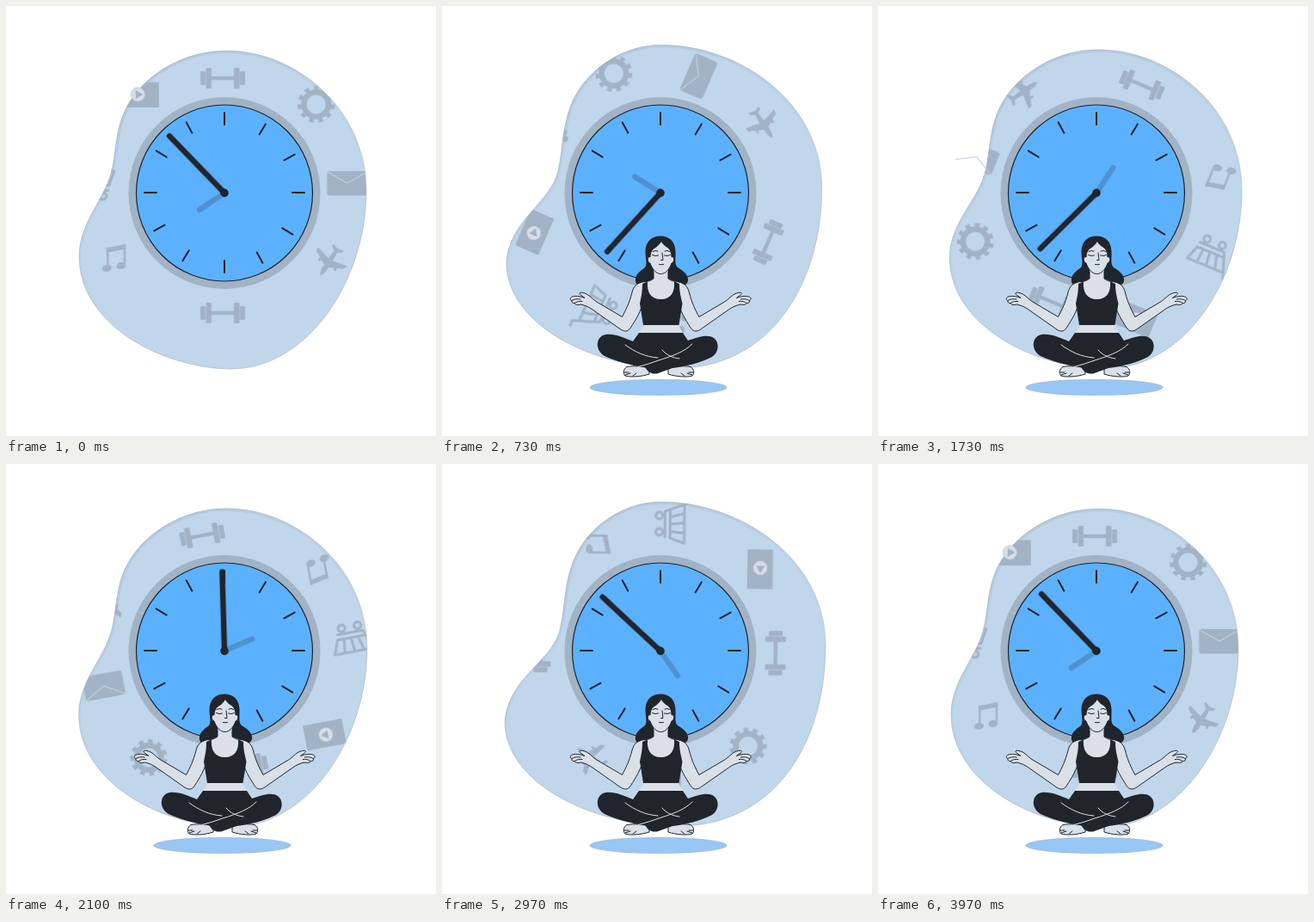
These frames come from a looping animation (500 px wide and 500 px high, 4.01 s). An HTML page without scripts:

```html
<!DOCTYPE html>
<html lang="en">
<head>
<meta charset="utf-8">
<title>Calm time</title>
<style>
  html, body { margin: 0; width: 100%; height: 100%; overflow: hidden; background: #fff; }
  svg { display: block; width: 100vw; height: 100vh; }

  .blob { animation: breathe 4.01s infinite; }
  .ring { animation: ring 4.01s -6ms infinite; }
  .minute { animation: minute 4.01s -6ms infinite; }
  .hour { animation: hour 4.01s -6ms infinite; }
  .rise { animation: rise 4.01s infinite, appear 4.01s infinite; }

  @keyframes breathe {
    0%, 49.5%, 99% {
      d: path("M257 52C205 52 165 80 146 108C128 134 129 160 124 186C117 224 85 250 85 291C85 372 185 422 262 422C350 422 419 320 419 215C419 118 335 52 257 52Z");
      animation-timing-function: cubic-bezier(.37, 0, .63, 1);
    }
    24.75%, 74.25% {
      d: path("M255 44C212 44 177 70 160 98C142 128 144 160 138 188C132 229 77 246 73 300C73 366 165 421 275 421C385 421 446 327 446 211C446 110 347 44 255 44Z");
      animation-timing-function: cubic-bezier(.37, 0, .63, 1);
    }
    100% {
      d: path("M257 52C205 52 165 80 146 108C128 134 129 160 124 186C117 224 85 250 85 291C85 372 185 422 262 422C350 422 419 320 419 215C419 118 335 52 257 52Z");
    }
  }
  @keyframes ring {
    0% { transform: rotate(0deg); animation-timing-function: steps(119); }
    99%, 100% { transform: rotate(-360deg); }
  }
  @keyframes minute {
    0% { transform: rotate(-44deg); animation-timing-function: steps(119); }
    99%, 100% { transform: rotate(1396deg); }
  }
  @keyframes hour {
    0% { transform: rotate(236deg); animation-timing-function: steps(119); }
    99%, 100% { transform: rotate(596deg); }
  }
  @keyframes rise {
    0% { transform: translateY(56px); animation-timing-function: cubic-bezier(.5, 1, .89, 1); }
    16.6%, 100% { transform: none; }
  }
  @keyframes appear {
    0%, .7% { opacity: 0; animation-timing-function: cubic-bezier(.33, 1, .68, 1); }
    16.6%, 100% { opacity: 1; }
  }

  .icon { fill: #a1b3c5; }
  .wire { fill: none; stroke: #a1b3c5; stroke-linecap: round; stroke-linejoin: round; }
  .dark { fill: #20252c; }
  .flesh { fill: #d9e0e8; }
  .skin { fill: #d9e0e8; stroke: #20252c; stroke-width: 1; stroke-linejoin: round; }
  .line { fill: none; stroke: #20252c; stroke-width: 1; stroke-linecap: round; }
  .fold { fill: none; stroke: #d9e0e8; stroke-width: 1; stroke-linecap: round; }
</style>
</head>
<body>
<svg viewBox="0 0 500 500" xmlns="http://www.w3.org/2000/svg">
  <defs>
    <clipPath id="inside"><path class="blob" d="M257 52"/></clipPath>
    <linearGradient id="rim" x2=".5" y2="1">
      <stop stop-color="#7f8b98" stop-opacity=".22"/>
      <stop offset=".7" stop-color="#7f8b98" stop-opacity="0"/>
    </linearGradient>
    <g id="bell" class="icon">
      <rect x="-26" y="-8" width="6" height="16" rx="1.5"/>
      <rect x="-19.5" y="-12" width="6.5" height="24" rx="1.5"/>
      <rect x="-14" y="-2.2" width="28" height="4.4"/>
      <rect x="13" y="-12" width="6.5" height="24" rx="1.5"/>
      <rect x="20" y="-8" width="6" height="16" rx="1.5"/>
    </g>
    <path id="tick" d="M0-93V-79"/>
    <g id="arm">
      <path class="skin" d="M238 320C227 321.500 223 325 221 333C218 345 214 353 209.500 361.500L179 343.500C174 340 170 334.500 164 333.500C159.500 332.500 158.500 334.500 162 336.500L166 339.500C161 337.500 154 336.500 150.500 338.500C148.500 340 149 342 151 342.500C150.500 344.500 152 346 154 345.500C155 347.500 158 348 161.500 347C166 348 171 350 175 353L207 375.500C212 379 216 379 219 374.500C226 364 231 355 234 344Z"/>
      <path class="line" d="M151 342.500C154 340.500 157 340.500 161 341M154 345.500C157 343.500 160 343 163 343.500"/>
    </g>
    <g id="foot">
      <path class="skin" d="M215 419.500C224 418 232 419 241 421V428C232 431 219 432 213 430C210 427 211 422 215 419.500Z"/>
      <path class="line" d="M212 426H217M213 429L219 427M222 430L226 427"/>
    </g>
  </defs>

  <path class="blob" d="M257 52" fill="#c0d6eb" stroke="#8b98a6" stroke-opacity=".5" stroke-width=".8"/>

  <g clip-path="url(#inside)">
    <path class="blob" d="M257 52" fill="none" stroke="url(#rim)" stroke-width="6"/>
    <g transform="translate(252.8 218.9)">
      <g class="ring">
        <use href="#bell" x="-.8" y="-135"/>
        <use href="#bell" x="-.8" y="138"/>
        <g transform="translate(107.800 -104.500)" class="wire">
          <circle r="14.200" stroke-width="6.500"/>
          <circle r="18.500" stroke-width="6" stroke-linecap="butt" pathLength="22" stroke-dasharray="1 1"/>
        </g>
        <rect class="icon" x="120.500" y="-27" width="47" height="28.500" rx="3.500"/>
        <!-- plane, nose down before turning -->
        <path class="icon" transform="translate(123.500 77.500) rotate(33)" d="M0 20C-2 18-3 14-3 10V7L-9 4L-10 7L-12 6V2L-19-1L-20-6L-3-2L-2-13L-7-16V-19L0-17L7-19V-16L2-13L3-2L20-6L19-1L12 2V6L10 7L9 4L3 7V10C3 14 2 18 0 20Z"/>
        <g transform="translate(-126.800 74)">
          <path class="icon" d="M-9-11.500L13-16V-10.500L-9-6Z"/>
          <path class="wire" stroke-width="2.500" stroke-linecap="butt" d="M-7.800-11V11M11.800-15V8"/>
          <ellipse class="icon" cx="-8.500" cy="12" rx="5.500" ry="4" transform="rotate(-12 -8.500 12)"/>
          <ellipse class="icon" cx="7.800" cy="9" rx="5.500" ry="4" transform="rotate(-12 7.800 9)"/>
        </g>
        <g transform="translate(-154 -18.400)" class="wire" stroke-width="3">
          <path d="M-27-16H-21L-10 14H20M-18-8.500H27L21 8H-12"/>
          <path d="M-7.500-8L-3.500 7M3.500-8L5 7M15-8L13.500 7"/>
          <circle cx="-5" cy="20.500" r="4"/>
          <circle cx="14" cy="20.500" r="4"/>
        </g>
        <rect class="icon" x="-121" y="-130.500" width="46" height="29.500" rx="1"/>
      </g>
    </g>
  </g>

  <g transform="translate(252.8 218.9)">
    <g class="ring">
      <path d="M122-25.500L144-13L166-25.500" fill="none" stroke="#c5ced8" stroke-width="1.200"/>
      <circle cx="-99.500" cy="-116" r="8.200" fill="#d8dee6" stroke="#b3bfcc" stroke-width=".6"/>
      <path class="icon" d="M-102-121L-93.500-116L-102-111Z"/>
    </g>
  </g>

  <g transform="translate(254 217)">
    <circle cy=".5" r="111.500" fill="#a1b3c5"/>
    <circle cy=".5" r="102.500" fill="#5cb1ff" stroke="#20252c" stroke-width="1.200"/>
    <g stroke="#20252c" stroke-width="2" stroke-linecap="round">
      <use href="#tick"/>
      <use href="#tick" transform="rotate(31)"/>
      <use href="#tick" transform="rotate(61.500)"/>
      <use href="#tick" transform="rotate(90)"/>
      <use href="#tick" transform="rotate(121.500)"/>
      <use href="#tick" transform="rotate(151.500)"/>
      <use href="#tick" transform="rotate(180)"/>
      <use href="#tick" transform="rotate(211.500)"/>
      <use href="#tick" transform="rotate(241.500)"/>
      <use href="#tick" transform="rotate(270)"/>
      <use href="#tick" transform="rotate(301.500)"/>
      <use href="#tick" transform="rotate(331.500)"/>
    </g>
    <g stroke="#20252c" stroke-width="6.500" stroke-linecap="round" transform="translate(0 .4)">
      <path class="hour" d="M0 0V-35" opacity=".22"/>
      <path class="minute" d="M0 0V-92"/>
    </g>
    <circle class="dark" cy=".4" r="4.800"/>
  </g>

  <g class="rise">
    <ellipse cx="251.500" cy="443.500" rx="79.600" ry="9.300" fill="#98c7f5" stroke="#8b98a6" stroke-opacity=".5" stroke-width=".8"/>

    <path class="dark" d="M254 267.500C243 267.500 237 274 236.500 285C236.500 294 239 300 236 304C232 307 226 311 225 317C224 324 229 327 237 325H274C282 326 287 323 286 317C285 311 279 307 274 304C270 300 272 294 271.500 285C271 274 265 267.500 254 267.500Z"/>

    <use href="#arm"/>
    <use href="#arm" transform="matrix(-1 0 0 1 508.400 0)"/>
    <path class="flesh" d="M246 306H263V317C268 320 273 320 277 323L279 345L275 371L281 382H228L235 371L231 345L233 323C237 320 242 320 246 317Z"/>
    <path class="line" d="M246 309V317C243 319.500 240 320 236 321M263 309V317C266 319.500 269 320 273 321"/>

    <path class="skin" d="M242 292C239 290 238 298 242 299C244.500 306 249 311.500 254.500 311.500C260 311.500 264.500 306 267 299C271 298 270 290 267 292C267 287 266 284 263 281C259 279 256 276 255 273C253 277 250 280 246 282C243 285 242 288 242 292Z"/>
    <path class="line" d="M244.500 289.500Q248 291.500 251.500 290M258.500 290Q262 291.500 265.500 289.500M245 285.500Q248 283.500 251 285M259 285Q262 283.500 265 285.500M256 287L257 295.500H254.500M252.500 300.500Q255 301 257.500 300.500"/>

    <path class="dark" d="M233 323L239 320.500C238 333 243 341 254.500 341C266 341 271 333 270 320.500L276 323C276 333 278 339 279.500 346L275.500 371H234L230 346C231.500 339 233 333 233 323Z"/>

    <use href="#foot"/>
    <use href="#foot" transform="matrix(-1 0 0 1 504 0)"/>
    <path class="dark" d="M229 380H280L286 389C297 385 309 381 316 386C323 391 322 403 314 408C300 415 284 419 268 421L250 427.500C246 428 242 427 239 424L236 420C219 418 202 413 189 407C179 401 178 388 187 383C196 379 211 385 222 390Z"/>
    <path class="fold" d="M213 394C224 402 236 408 251 409M291 393C282 402 268 407 252 412C244 415 236 417.500 228 419.500M256 400C261 406 268 409 276 410"/>
  </g>
</svg>
</body>
</html>
```
